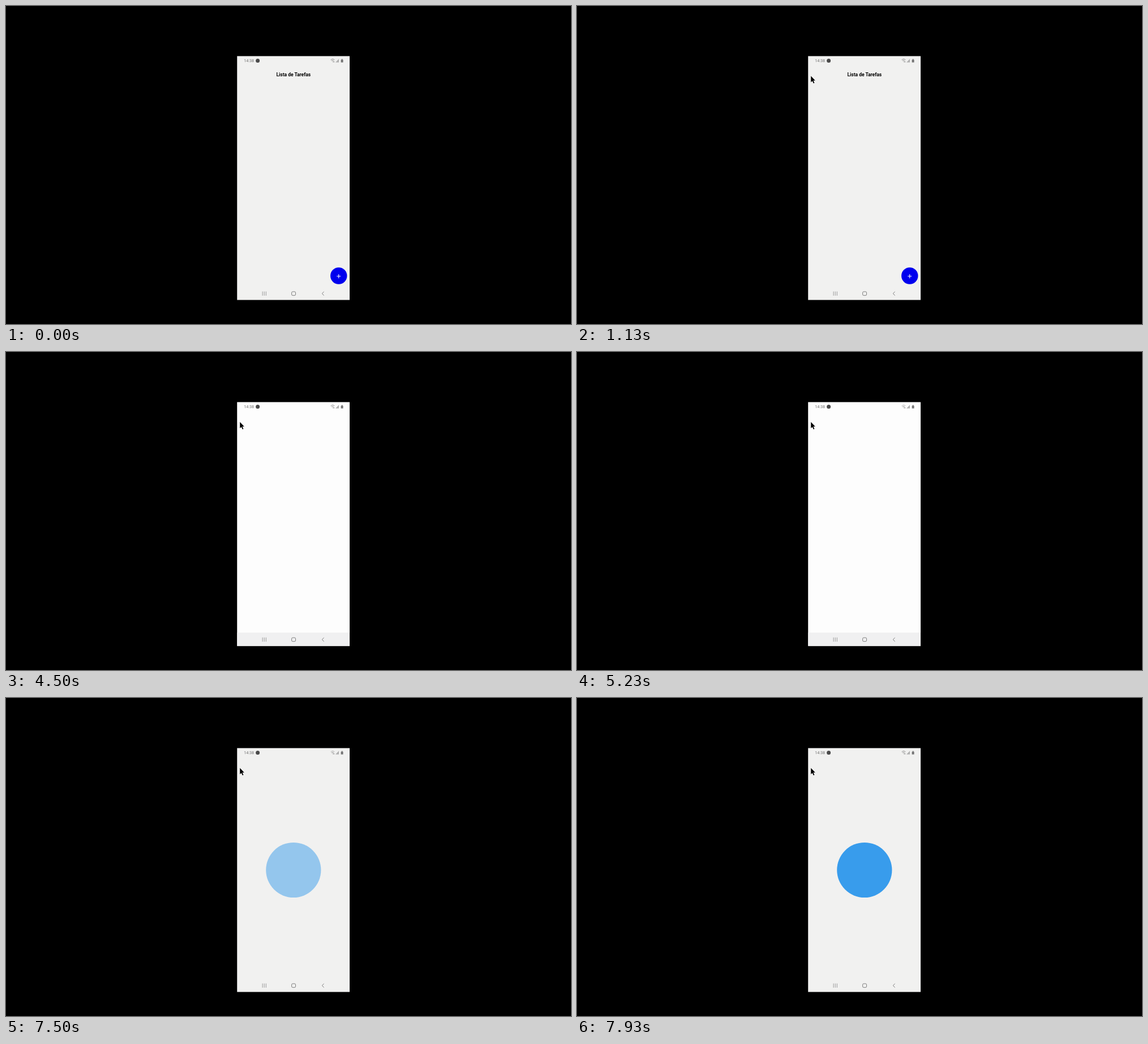
An HTML page for the animation above (8000 ms loop, 998 by 561 pixels).

```html
<!DOCTYPE html>
<html lang="pt">
<head>
<meta charset="utf-8">
<title>Lista de Tarefas</title>
<style>
html, body { margin: 0; width: 100%; height: 100%; overflow: hidden; background: #000; }
svg { display: block; width: 100vw; height: 100vh; }
text { font-family: Roboto, sans-serif; }
</style>
</head>
<body>
<svg viewBox="0 0 998 561">
  <rect width="998" height="561"/>
  <rect id="screen" x="408.2" y="88.4" width="198.8" height="430.2" fill="#f1f1f0"/>
  <rect id="navBar" x="408.2" y="495" width="198.8" height="23.6" fill="#f0f0f1"/>

  <g fill="#737373">
    <text x="420.2" y="99.3" font-size="7.2">14:38</text>
    <circle id="badge" cx="444.6" cy="96.4" r="3.5" fill="#4a4a4a"/>
    <g fill="none" stroke="#858585" stroke-width=".9">
      <path id="wifi" d="M573.6 95.2Q577 92 580.4 95.2"/>
      <path d="M575 96.8Q577 95 579 96.8M577 98.6L580.5 98.6"/>
    </g>
    <path d="M582 99.5L588 93.3V99.5Z" fill="#b0b0b0"/>
    <path d="M592.8 93.4H594.4V94.8H595.5V99.4H591.6V94.8H592.8Z"/>
  </g>

  <g fill="none" stroke="#7a7a7a" stroke-width="1">
    <path d="M453.1 503.6V511M456.2 503.6V511M459.3 503.6V511" stroke="#999"/>
    <rect x="504.6" y="504" width="6.9" height="6.6" rx="1.8"/>
    <path d="M561.6 504L558.2 507.3L561.6 510.7"/>
  </g>

  <g id="home">
    <text x="507.8" y="124.1" font-size="8.5" font-weight="700" text-anchor="middle">Lista de Tarefas</text>
    <circle cx="587.7" cy="476" r="14.7" fill="#0000ee"/>
    <path d="M584.2 476.8H591.2M587.7 473.3V480.3" stroke="#fff" stroke-width="1.1"/>
  </g>

  <g id="update">
    <rect x="408.2" y="477" width="198.8" height="18" fill="#f9f9f9"/>
    <path d="M408.2 477.5H607" stroke="#d8d8dc"/>
    <text x="413" y="488.6" font-size="6.5" fill="#a6a6aa">New update available, downloading...</text>
  </g>

  <circle id="splash" cx="507.8" cy="303.5" r="48.6" fill="#389cec"/>

  <path id="cursor" d="M0 0V10.8L2.5 8.6L4.6 13L6.2 12.2L4.3 7.9H7.6Z"/>
</svg>
<script>
const LOOP = 8000;
const $ = id => document.getElementById(id);
const clamp = v => Math.min(1, Math.max(0, v));
const show = (id, on) => $(id).setAttribute('visibility', on ? 'visible' : 'hidden');
const mix = (a, b, k) => a + (b - a) * k;
const ease = k => k * k * (3 - 2 * k);

// Progress in n held steps: the first lands at start, the last at end.
function steps(t, start, end, n) {
  if (t < start) return 0;
  return clamp((Math.floor((t - start) / (end - start) * (n - 1) + 1e-6) + 1) / n);
}

function cursorAt(t) {
  const enter = ease(steps(t, 30, 170, 5));
  const leave = ease(steps(t, 900, 1130, 6));
  return [
    mix(mix(598, 549, enter), 413.2, leave),
    mix(mix(496, 406, enter), 123.6, leave)
  ];
}

function draw(t) {
  const blank = t >= 3800 && t < 7300;
  $('screen').setAttribute('fill', blank ? '#fdfdfd' : '#f1f1f0');
  show('navBar', blank);
  show('home', t < 3800);
  show('update', t >= 3800 && t < 4500);
  $('update').setAttribute('opacity', t < 4400 ? 1 : 0.5);
  show('badge', t < 3800 || t >= 4500);
  $('wifi').setAttribute('opacity', t >= 4900 && t < 7930 ? 0.65 : 1);
  $('splash').setAttribute('opacity', clamp(Math.floor((t - 7300) / 50) / 8));
  show('cursor', t >= 30);
  $('cursor').setAttribute('transform', `translate(${cursorAt(t)})`);
}

const begin = performance.now();
function tick() {
  draw((performance.now() - begin) % LOOP);
  requestAnimationFrame(tick);
}
tick();
</script>
</body>
</html>
```
